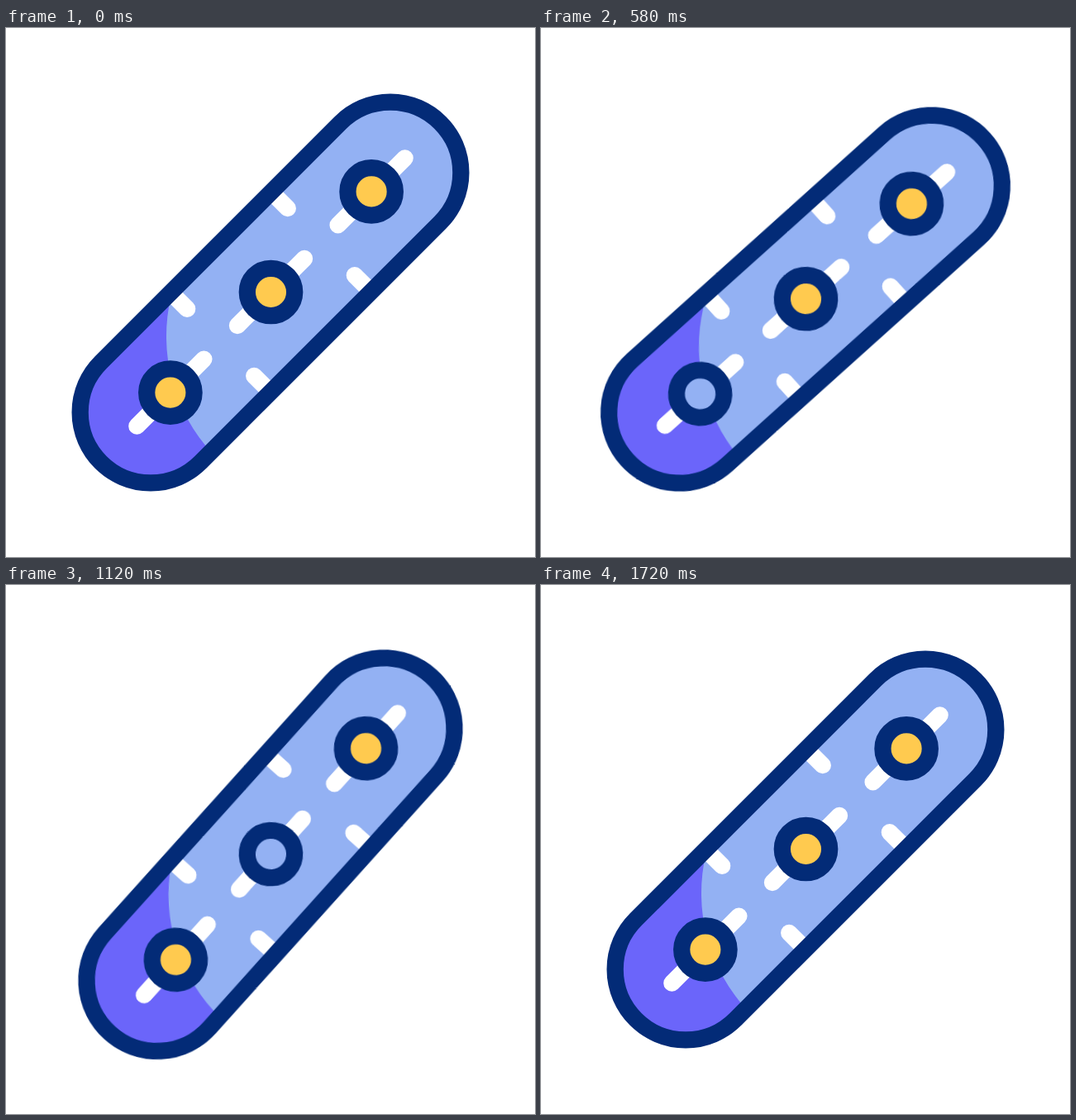
Recreate the animation shown at these times as an HTML page. Size 640 by 640 pixels, loop 1.8 s.

```html
<!DOCTYPE html>
<html lang="en">
<head>
<meta charset="utf-8">
<title>Board</title>
<style>
  html, body { margin: 0; width: 100%; height: 100%; overflow: hidden; background: #fff; }
  svg { display: block; width: 100%; height: 100%; }
  #lift, #tilt { transform-origin: 320px 320px; }
  .line { fill: none; stroke: #032b77; stroke-width: 20.3; }
  .marks { fill: none; stroke: #fff; stroke-width: 20.3; stroke-linecap: round; }
</style>
</head>
<body>
<svg viewBox="0 0 640 640">
  <defs>
    <rect id="board" x="-290.4" y="-85.35" width="580.8" height="170.7" rx="85.35"
      transform="translate(320 320) rotate(-45)"/>
    <clipPath id="inside"><use href="#board"/></clipPath>
  </defs>
  <g id="lift"><g id="tilt">
    <use href="#board" fill="#93b1f3"/>
    <path clip-path="url(#inside)" fill="#6b65fa" d="M199.6 325A208 208 0 0 0 250 515L60 600V325Z"/>
    <g transform="translate(320.5 319.5) rotate(-45)">
      <path class="marks" d="M86-57.3V-85M-86-57.3V-85M86 57.3V85M-86 57.3V85"/>
      <path class="marks" d="M-229.3 0h114.6M-57.3 0h114.6M114.7 0h114.6"/>
      <g id="dots"></g>
    </g>
    <use href="#board" class="line"/>
  </g></g>
</svg>
<script>
const LOOP = 1800;
const GOLD = '#ffca4f', BLUE = '#93b1f3';

// steps: [time in ms, value]
function play(el, prop, steps, easing, format = v => v) {
  const frames = steps.map(([ms, v]) => ({ offset: ms / LOOP, [prop]: format(v), easing }));
  el.animate(frames, { duration: LOOP, iterations: Infinity }).startTime = 0;
}

const byId = id => document.getElementById(id);

play(byId('lift'), 'transform',
  [[0, 0], [85, 0], [805, 10.2], [1520, 0], [LOOP, 0]],
  'ease-in-out', y => `translateY(${y}px)`);

play(byId('tilt'), 'transform',
  [[0, 0], [20, 0], [567, 3.05], [1090, -3.05], [1550, 0], [LOOP, 0]],
  'ease-in-out', deg => `rotate(${deg}deg)`);

for (let i = 0; i < 3; i++) {
  const dot = document.createElementNS('http://www.w3.org/2000/svg', 'circle');
  dot.setAttribute('class', 'line');
  dot.setAttribute('cx', (i - 1) * 172);
  dot.setAttribute('r', 28.7);
  byId('dots').append(dot);
  const on = 40 + i * 560;
  play(dot, 'fill', [[0, GOLD], [on, BLUE], [on + 560, GOLD], [LOOP, GOLD]], 'step-end');
}
</script>
</body>
</html>
```
